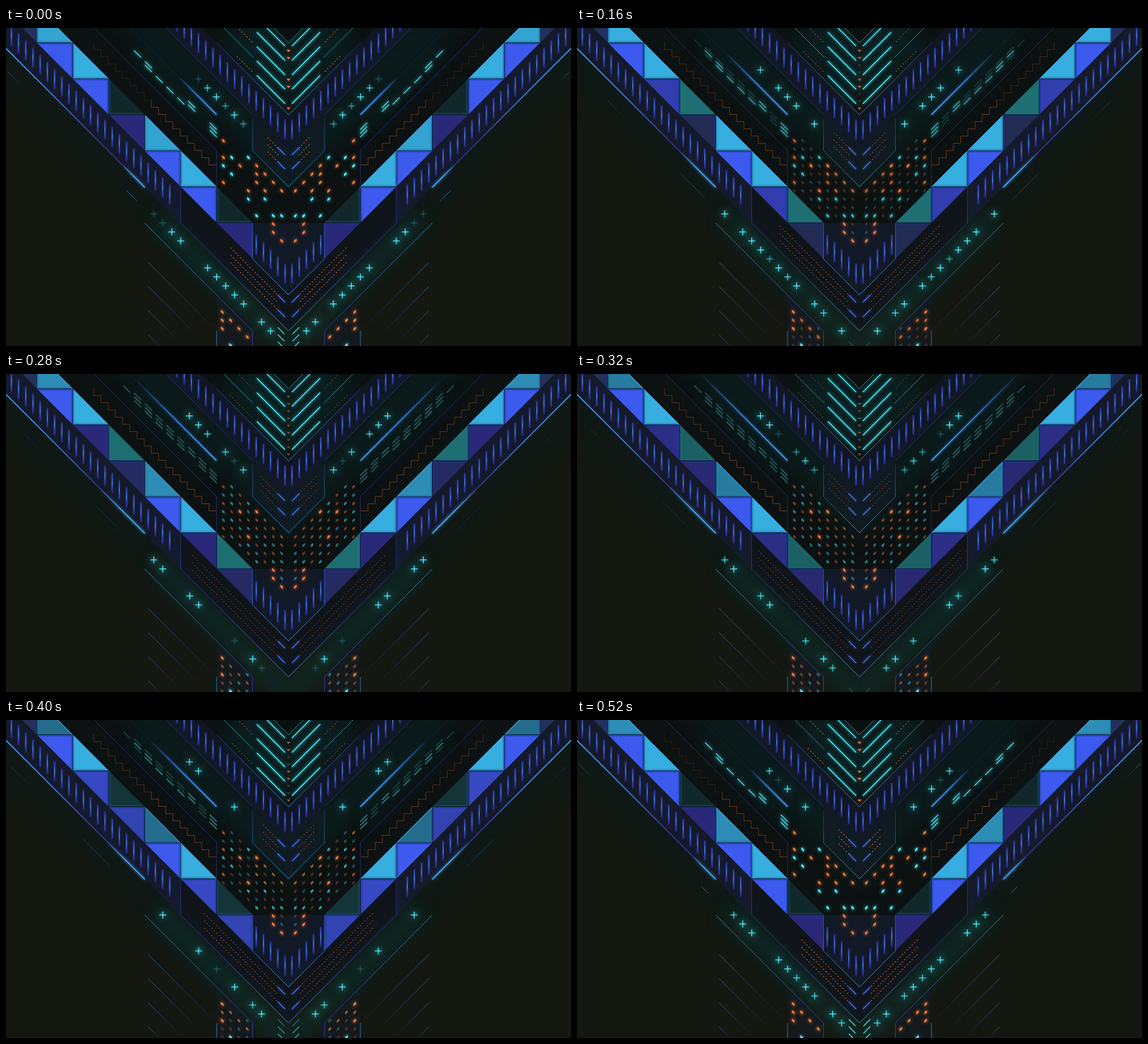
Animation of 998x561 px, one loop 560 ms. Source, as an HTML page with a canvas:

```html
<!DOCTYPE html>
<html>
<head>
<meta charset="utf-8">
<style>
html, body { margin: 0; height: 100%; overflow: hidden; background: #141811; }
canvas { display: block; }
</style>
</head>
<body>
<canvas id="stage" width="998" height="561"></canvas>
<script>
const stage = document.getElementById('stage').getContext('2d');
const half = document.createElement('canvas');
half.width = 499;
half.height = 561;
const g = half.getContext('2d');

const STEP = 40, STEPS = 14, CELL = 63.5;
const CYAN = '#4ff0ff', ORANGE = '#f47a3c', SKY = '#3fa4f0';
let step, swell, sweep;

// Cyclic pulse: 1 at the peak, 0 from `width` steps away
function pulse(peak, width) {
  const d = Math.abs(step - peak), near = Math.min(d, STEPS - d);
  return near < width ? Math.cos(near / width * Math.PI / 2) : 0;
}
const mix = (a, b, k) => `rgb(${a.map((v, i) => Math.round(v + (b[i] - v) * k))})`;

function path(points, color, width = 1) {
  g.beginPath();
  for (const [x, y] of points) g.lineTo(x, y);
  g.strokeStyle = color;
  g.lineWidth = width;
  g.stroke();
}
function fill(points, color) {
  g.beginPath();
  for (const [x, y] of points) g.lineTo(x, y);
  g.closePath();
  g.fillStyle = color;
  g.fill();
}
function ramp(x0, y0, x1, y1, ...colors) {
  const grad = g.createLinearGradient(x0, y0, x1, y1);
  colors.forEach((c, i) => grad.addColorStop(i / (colors.length - 1), c));
  return grad;
}
// All slanted parts lie on y = x + offset
const diag = (x0, x1, offset, color, width) => path([[x0, x0 + offset], [x1, x1 + offset]], color, width);
const streak = (x0, x1, offset, width, ...colors) =>
  diag(x0, x1, offset, ramp(x0, x0 + offset, x1, x1 + offset, ...colors), width);

function faded(alpha, draw) {
  if (alpha <= 0) return;
  g.save();
  g.globalAlpha = Math.min(1, alpha);
  draw();
  g.restore();
}
function glowing(color, blur, draw) {
  g.save();
  g.shadowColor = color;
  g.shadowBlur = blur;
  draw();
  g.restore();
}
function haze(x0, x1, offset, width, color) {
  g.save();
  g.filter = 'blur(16px)';
  diag(x0, x1, offset, color, width);
  g.restore();
}

function background() {
  g.fillStyle = '#141811';
  g.fillRect(0, 0, 499, 561);
  haze(-60, 420, 50, 80, 'rgba(8,28,28,.35)');
  fill([[-9, 26], [308, 343], [499, 534], [499, 0], [-9, 0]], '#0c1111');
  haze(180, 520, -250, 60, 'rgba(10,46,46,.35)');
  haze(270, 510, 67, 34, 'rgba(12,62,62,.45)');
  haze(410, 520, -410, 90, 'rgba(10,56,58,.35)');
  haze(225, 360, -187, 26, 'rgba(10,56,56,.25)');
  fill([[-40, -68], [308, 280], [308, 344], [-40, -4]], 'rgba(26,32,54,.65)');
  fill([[308, 280], [435, 407], [499, 471], [499, 534], [308, 344]], 'rgba(20,25,38,.4)');
  fill([[308, -38], [499, 153], [499, 217], [250, -32]], 'rgba(24,30,56,.45)');
  fill([[435, 153], [499, 217], [499, 280], [435, 216]], 'rgba(22,30,44,.45)');
  fill([[435, 344], [499, 344], [499, 471], [435, 407]], 'rgba(24,32,56,.55)');
  fill([[372, 471], [435, 534], [435, 561], [372, 561]], 'rgba(22,28,44,.45)');
  fill([[473, 0], [499, 0], [499, 26]], '#0a1010');
}

function triangles() {
  const piece = (a, corner, b, color, rim) => {
    fill([a, corner, b], color);
    g.save();
    g.clip();
    path([a, corner, b], rim, 7);
    path([a, corner, b], 'rgba(8,14,30,.7)', 1.5);
    g.restore();
  };
  const cyan = [54, 174, 224], blue = [60, 90, 238], violet = [42, 40, 120];
  const upper = [
    mix(cyan, [36, 108, 140], pulse(10, 4.5)),
    mix(cyan, cyan, 0),
    mix([16, 40, 42], [32, 120, 122], pulse(5.5, 5))
  ];
  const lower = [
    mix(violet, pulse(11, 2) ? [52, 80, 200] : [34, 43, 80], pulse(11, 2) || pulse(4.5, 4)),
    mix(blue, blue, 0),
    mix(blue, violet, pulse(6.7, 4.3))
  ];
  for (let i = 0; i < 7; i++) {
    const x = -9 + i * CELL, y = x - 28.5;
    piece([x, y], [x + CELL, y], [x + CELL, y + CELL], i ? lower[i % 3] : '#22305a', 'rgba(30,50,150,.35)');
    if (i == 6) break;
    const left = x + CELL;
    piece([left, y], [left, y + CELL], [left + CELL, y + CELL], upper[i % 3], 'rgba(20,110,150,.3)');
    if (i % 3 < 2) diag(left + 1, left + CELL, -91, 'rgba(70,170,245,.7)', 1.5);
  }
}

function ticks(first, last, offset) {
  glowing('#3040ff', 3, () => {
    for (let x = first; x <= last; x += 12.72) {
      const y = x + offset;
      path([[x, y], [x, y + 35]], ramp(0, y, 0, y + 35, '#34369c', '#4468e8', '#48a6f0', '#464cd8', '#302f90'), 1.4);
    }
  });
}

function outlines() {
  path([[156, 0], [372, 216], [372, 282]], '#28317c');
  path([[282, 0], [435, 153]], '#263280');
  path([[372, 26], [499, 153]], ramp(372, 26, 499, 153, '#2c3490', '#3f9cd8'));
  path([[435.5, 160], [435.5, 216.5], [499, 280]], ramp(0, 160, 0, 280, 'rgba(50,130,200,.3)', '#3f9ce0'));
  path([[435.5, 344], [435.5, 407.5], [499, 471]], ramp(0, 344, 0, 471, '#2f50b0', '#3f9ce8'));
  path([[308.5, 280], [308.5, 344], [499, 534.5]], ramp(0, 280, 0, 534, '#282d78', '#3340a0', '#3fa0e0'));
  path([[245, 344], [435.5, 534.5], [435.5, 561]], ramp(0, 344, 0, 534, '#3590b8', '#2f62b0', '#363fae'));
  path([[372, 534], [372, 561]], '#2f7cc0');
  for (let i = 0; i < 4; i++) {
    streak(251, 365 - i * 30, 162.5 + i * 42.5, 1, '#26699c', '#223a84', 'rgba(36,50,130,.3)');
  }
}

function streaks() {
  streak(-2, 246, 36, 2, '#3f96f0', '#3576e0', '#303088', '#303088');
  glowing(SKY, 5, () => streak(205 - 45 * sweep, 245, 36, 2, 'rgba(63,164,240,0)', SKY, SKY));
  diag(219, 372, -219, 'rgba(46,56,150,.35)');
  glowing('#2a7cf0', 4, () => streak(305 - 85 * sweep, 372, -219, 1.8, 'rgba(50,110,230,0)', '#3584e8', '#4aa8f6'));

  // Loose glints drifting up and left outside the band
  const x1 = 85 - 7.6 * (step < 3 ? step + STEPS : step);
  const x2 = 219.6 - 7.6 * ((step + 1) % STEPS);
  const glow = 1 - .7 * swell;
  faded(glow, () => streak(Math.max(3, x1), x1 + 47, 74, 1, '#2a6cae', 'rgba(30,70,130,.1)'));
  faded(glow, () => streak(x2, Math.min(232, x2 + 48), 74, 1, '#2a60a8', '#3480cc', 'rgba(48,120,190,.5)'));
}

function staircase() {
  for (let i = 0; i < 17; i++) {
    const x = 155 + i * 12.72, y = 38 + i * 12.72;
    faded(i < 8 ? .25 + .3 * swell : .65, () => path([[x, y - 12.7], [x, y], [x + 12.7, y]], '#a85a2c'));
  }
}

// Upper case stays lit, o and c dim in mid-loop, a and b light up only then
function lamp(kind, draw) {
  const alpha = 'OC'.includes(kind) ? 1 : 'oc'.includes(kind) ? 1 - .5 * swell : .42 * swell;
  const color = 'Ooa'.includes(kind) ? ORANGE : CYAN;
  faded(alpha, () => glowing(color, alpha > .7 ? 6 : 0, () => draw(color)));
}
function tiles(rows, draw) {
  rows.forEach((row, r) => [...row].forEach((kind, c) => kind != '.' && lamp(kind, color => draw(c, r, color))));
}

function diamonds(x0, y0, rows) {
  tiles(rows, (c, r, color) => {
    const x = x0 + c * 14.7, y = y0 + r * 14.7;
    fill([[x - 2.3, y - 4], [x + 2.3, y - .6], [x + 2.3, y + 4], [x - 2.3, y + .6]], color);
  });
}

function dashes() {
  tiles(['..bbbbbcbc', '.bccbbbcbc', '..bcccc.bc'], (c, r, color) => {
    const x = 188 + c * 19.1;
    diag(x, x + 12.5, -193 + r * 6.5, color, 1.4);
  });
}

function pluses(x0, y0, peaks) {
  peaks.forEach((peak, i) => {
    const x = x0 + i * 15.88, y = y0 + i * 15.88, alpha = 1.5 * pulse(peak, 4.8);
    faded(alpha, () => glowing('#20d8e8', alpha > .7 ? 12 : 3, () => {
      path([[x - 6, y], [x + 6, y]], CYAN, 1.6);
      path([[x, y - 6], [x, y + 6]], CYAN, 1.6);
    }));
  });
}

function chevrons() {
  diag(473, 499, -473, '#2a9ca8');
  diag(384, 437, -385, '#2a9ca8');
  glowing('#18c8d8', 5, () => {
    for (let i = 0; i < 5; i++) {
      const offset = -461 + i * 25.4;
      diag(Math.max(443, -offset), 493, offset, CYAN, 1.7);
    }
  });
  tiles([...'oobboobbo'].map(kind => kind == 'b' ? 'a' : kind), (c, r, color) => {
    const y = 38.5 + r * 12.72;
    fill([[495.5, y], [499, y], [499, y + 4]], color);
  });
  glowing('#3050ff', 4, () => {
    for (const offset of [-269, -244, -9, 17]) diag(480, 493, offset, '#4a80f0', 1.4);
  });
  for (let i = 0; i < 3; i++) {
    faded(pulse(13, 4 + i), () => diag(480, 492, 48 + i * 12.7, CYAN, 1.4));
  }
}

function dots(first, last, start, lanes) {
  g.fillStyle = ORANGE;
  faded(.95 - .5 * swell, () => {
    for (const offset of lanes) {
      for (let x = last; x > first; x -= 4.24) {
        if (x >= start) g.fillRect(x - .8, x + offset - .8, 1.6, 1.6);
      }
    }
  });
}

function drawHalf() {
  swell = Math.max(0, Math.sin(Math.PI * (step - 2) / 10.5));
  sweep = step < 8 ? step / 8 : (13 - step) / 5;
  background();
  triangles();
  outlines();
  streaks();
  ticks(9.5, 292, -13);
  ticks(302, 495, -331);
  ticks(442, 495, -77);
  staircase();
  chevrons();
  dashes();
  dots(317, 478, 397 - 80 * sweep, [-9, 4, 17]);
  dots(446, 480, 461 - 15 * sweep, [-269, -256.5, -244]);
  dots(391, 434, 408 - 17 * sweep, [-358]);
  dots(410, 434, 410, [-410]);
  diamonds(384, 199, [
    'ob', 'bba', 'ocac', 'caObO', 'bcaaoo', 'oabboao', 'abaOboao',
    '..bcacba', '...abaab', '....cacc', '......Oa', '......Ob', '.......O'
  ]);
  diamonds(382, 501, ['O', 'oo', 'Oaob', 'aabo', 'aCab']);
  pluses(324, 74, [7, 9.5, 3.5, 1.5, 4, 11.5, 4]);
  pluses(261, 328, [4.5, 9.5, 1.5, 1.5, 5, 8, 1.5, .5, 2, 11.5, 2, 7, 11.5, 2]);
}

let shown;
function tick(now) {
  step = Math.floor(now / STEP) % STEPS;
  if (step !== shown) {
    shown = step;
    drawHalf();
    stage.setTransform(1, 0, 0, 1, 0, 0);
    stage.drawImage(half, 0, 0);
    stage.setTransform(-1, 0, 0, 1, 998, 0);
    stage.drawImage(half, 0, 0);
  }
  requestAnimationFrame(tick);
}
requestAnimationFrame(tick);
</script>
</body>
</html>
```
